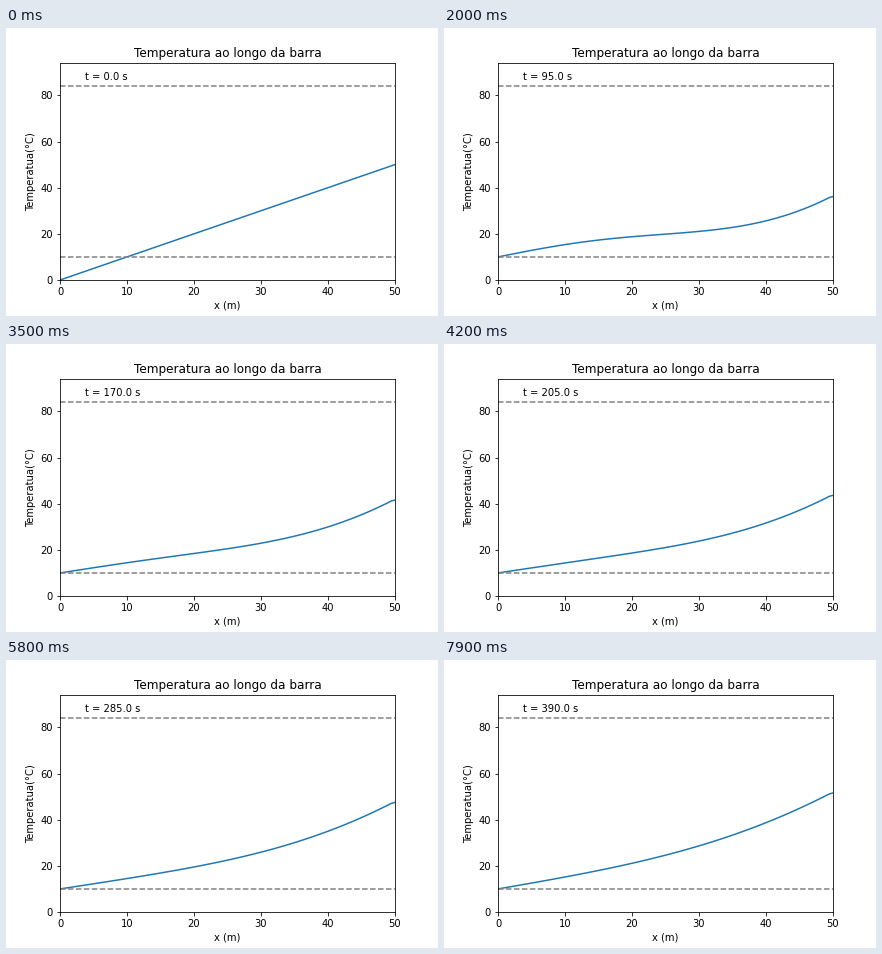
Recreate the animation shown at these times as a matplotlib script. Size 432 by 288 pixels, loop 8 s.

```python
import numpy as np
import matplotlib.pyplot as plt
from matplotlib.animation import FuncAnimation

LENGTH, CELLS = 50.0, 50
T_START, T_LEFT, T_MAX = 20.0, 10.0, 84.25
SLOPE = 1.5            # heat flux / conductivity at the right end
ALPHA = 1.0            # diffusivity, m^2/s
DT, STEPS = 0.25, 20   # 5 s of simulated time per frame
FRAMES = 80

dx = LENGTH / CELLS
x = np.concatenate(([0], (np.arange(CELLS) + 0.5) * dx, [LENGTH]))


def advance(temp):
    """One explicit finite-volume step on the cell centres."""
    grad = np.empty(CELLS + 1)
    grad[0] = (temp[0] - T_LEFT) / (dx / 2)
    grad[1:-1] = np.diff(temp) / dx
    grad[-1] = SLOPE
    return temp + ALPHA * DT / dx * np.diff(grad)


def simulate(count):
    temp = np.full(CELLS, T_START)
    profiles = []
    for _ in range(count):
        end = temp[-1] + SLOPE * dx / 4
        profiles.append(np.concatenate(([T_LEFT], temp, [end])))
        for _ in range(STEPS):
            temp = advance(temp)
    return profiles


profiles = simulate(FRAMES - 1)

fig, ax = plt.subplots(figsize=(6, 4), dpi=72)
fig.subplots_adjust(left=0.125, right=0.9, bottom=0.125, top=0.88)
line, = ax.plot(x, x)
for level in (T_LEFT, T_MAX):
    ax.axhline(level, color="gray", linestyle="--")
clock = ax.text(0.075, 0.92, "", transform=ax.transAxes)
ax.set(xlim=(0, LENGTH), ylim=(0, T_MAX + 10), xlabel="x (m)",
       ylabel="Temperatua(°C)", title="Temperatura ao longo da barra")


def update(i):
    # The first picture shows the plain ramp before the simulation starts.
    line.set_ydata(x if i == 0 else profiles[i - 1])
    clock.set_text(f"t = {max(i - 1, 0) * DT * STEPS:.1f} s")
    return line, clock


anim = FuncAnimation(fig, update, frames=FRAMES, interval=100,
                     repeat=True, repeat_delay=0)
plt.show()
```
